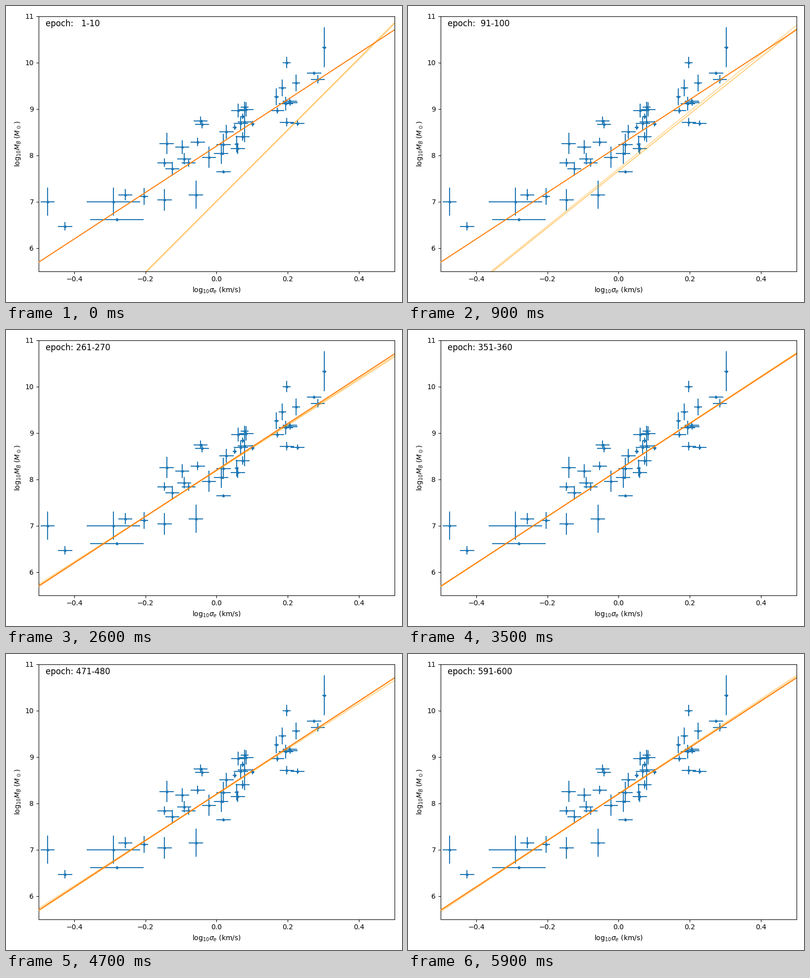
Animation of 800 by 600 pixels, one loop 6000 ms. Source, as a matplotlib script:

```python
import numpy as np
import matplotlib.pyplot as plt
from matplotlib.animation import FuncAnimation

FRAMES = 60
STEP = 10  # samples drawn per frame
EDGES = np.array([-0.5, 0.5])

# measurements grouped by their error: (x error, y error) -> points
POINTS = {
    (.075, .30): [(-.29, 7.0)],
    (.075, .03): [(-.28, 6.615)],
    (.020, .03): [(.019, 7.645), (.2735, 9.775)],
    (.020, .06): [(.1705, 8.965), (.2055, 9.17), (.207, 9.135),
                  (.2275, 8.69)],
    (.020, .09): [(-.426, 6.47), (-.1465, 7.84), (-.0785, 7.84),
                  (-.053, 8.285), (-.045, 8.745), (-.041, 8.67),
                  (.073, 8.405), (.197, 8.71), (.2845, 9.635)],
    (.020, .12): [(-.2565, 7.15), (-.091, 7.925), (.0595, 8.145)],
    (.020, .15): [(-.1245, 7.71), (-.0965, 8.18), (.0275, 8.51),
                  (.061, 8.965), (.068, 8.69), (.083, 8.99),
                  (.1945, 9.115)],
    (.020, .23): [(-.1465, 7.04), (-.14, 8.255), (-.0215, 7.955),
                  (.013, 8.04), (.019, 8.235)],
    (.020, .30): [(-.475, 7.0), (-.058, 7.15)],
    (.020, .435): [(.079, 8.72)],
    (.011, .12): [(.079, 9.04), (.197, 10.0)],
    (.011, .18): [(-.204, 7.11), (.185, 9.455), (.2235, 9.56)],
    (.006, .06): [(.051, 8.605), (.073, 8.84), (.101, 8.68)],
    (.006, .18): [(.0565, 8.245), (.168, 9.265)],
    (.006, .435): [(.3025, 10.33)],
}

# drift of the sampled line: epoch, height at the left and right edge
DRIFT = np.array([(0, 3.20, 10.81), (10, 3.32, 10.72), (95, 4.66, 10.75),
                  (165, 5.68, 10.73), (265, 5.72, 10.65),
                  (355, 5.71, 10.70), (475, 5.69, 10.69),
                  (595, 5.68, 10.74)])


def build_chain(seed=4):
    """Random walk around the drift; a rejected move repeats the last line."""
    rng = np.random.default_rng(seed)
    chain = []
    for epoch in range(FRAMES * STEP):
        if not chain or rng.random() < 0.35:
            ends = [np.interp(epoch, DRIFT[:, 0], DRIFT[:, k]) for k in (1, 2)]
            swing = rng.normal(0, 0.025 + 0.03 * np.exp(-epoch / 60))
            chain.append(np.array(ends) + (swing, -swing))
        else:
            chain.append(chain[-1])
    return chain


chain = build_chain()

fig, ax = plt.subplots(figsize=(8, 6), dpi=100)
for (x_err, y_err), group in POINTS.items():
    ax.errorbar(*zip(*group), xerr=x_err, yerr=y_err, fmt=".", color="C0")
samples = [ax.plot(EDGES, chain[i], color="orange", alpha=0.1)[0]
           for i in range(STEP)]
ax.plot(EDGES, 8.2 + 5.01 * EDGES, color="C1", zorder=3)
label = ax.text(0.02, 0.96, "", fontsize=12, transform=ax.transAxes)

ax.set_xlim(EDGES)
ax.set_ylim(5.5, 11)
ax.set_xlabel(r"log$_{10}\sigma_e$ (km/s)")
ax.set_ylabel(r"log$_{10}M_B$ ($M_\odot$)")
fig.tight_layout()


def update(frame):
    first = frame * STEP
    for line, ends in zip(samples, chain[first:first + STEP]):
        line.set_ydata(ends)
    label.set_text(f"epoch: {first + 1:3d}-{first + STEP}")
    return [*samples, label]


anim = FuncAnimation(fig, update, frames=FRAMES, interval=100,
                     init_func=lambda: update(0), repeat=True, repeat_delay=0)
plt.show()
```
